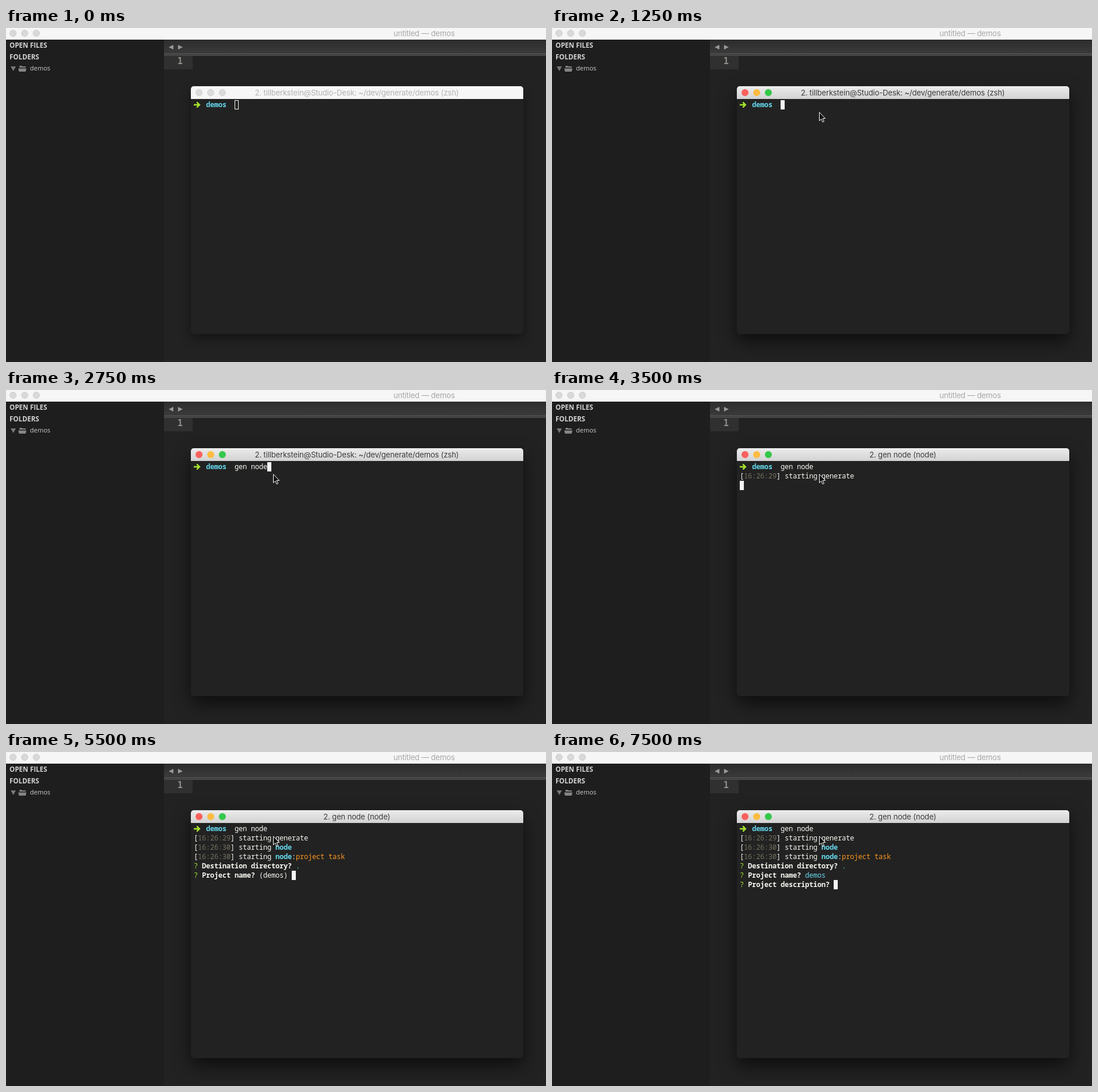
An HTML page that plays this animation: 926 by 574 pixels, repeating every 8 s.

```html
<!DOCTYPE html>
<html lang="en">
<head>
<meta charset="utf-8">
<title>Terminal session</title>
<style>
  html, body { margin: 0; width: 100%; height: 100%; overflow: hidden; background: #222; }
  svg { display: block; width: 926px; height: 574px; }
  text { white-space: pre; }

  .title { font: 13px Inter, sans-serif; letter-spacing: -.15px; text-anchor: middle; fill: #3c3c3c; }
  .faded { fill: #b2b2b2; }
  .side { font: 11px "Open Sans", sans-serif; fill: #ccc; }
  .head { font: bold 11.5px "Open Sans", sans-serif; fill: #d2d2d2; }
  .gutter { font: bold 15px "DejaVu Sans Mono", monospace; fill: #8f908a; }
  .shell { font: 12px "Noto Sans Mono", monospace; letter-spacing: -.2px; fill: #f8f8f2; }
  .b { font-weight: bold; }
  .c { fill: #66d9ef; }
  .g { fill: #a6e22e; }
  .o { fill: #fd971f; }
  .d { fill: #75715e; }

  .rest { filter: drop-shadow(0 8px 9px rgba(0, 0, 0, .4)); }
  .lift { filter: drop-shadow(0 13px 15px rgba(0, 0, 0, .6)); }

  /* every change is a hard cut within one 8 s loop */
  .s, #block, #mouse { animation: 8s step-end infinite; }
  #block { animation-name: block; }
  #mouse { animation-name: mouse; }

  @keyframes idle    { 0% { visibility: visible } 15.625%, 100% { visibility: hidden } }
  @keyframes active  { 0% { visibility: hidden } 15.625%, 100% { visibility: visible } }
  @keyframes prompt  { 0% { visibility: hidden } 15.625% { visibility: visible } 40.625%, 100% { visibility: hidden } }
  @keyframes launch  { 0% { visibility: hidden } 40.625% { visibility: visible } 43.75%, 100% { visibility: hidden } }
  @keyframes key1    { 0% { visibility: hidden } 25%, 100% { visibility: visible } }
  @keyframes key2    { 0% { visibility: hidden } 28.125%, 100% { visibility: visible } }
  @keyframes key3    { 0% { visibility: hidden } 31.25%, 100% { visibility: visible } }
  @keyframes key4    { 0% { visibility: hidden } 34.375%, 100% { visibility: visible } }
  @keyframes start   { 0% { visibility: hidden } 43.75%, 100% { visibility: visible } }
  @keyframes ask1    { 0% { visibility: hidden } 53.125%, 100% { visibility: visible } }
  @keyframes hint1   { 0% { visibility: hidden } 53.125% { visibility: visible } 65.625%, 100% { visibility: hidden } }
  @keyframes answer1 { 0% { visibility: hidden } 65.625%, 100% { visibility: visible } }
  @keyframes ask2    { 0% { visibility: hidden } 68.75%, 100% { visibility: visible } }
  @keyframes hint2   { 0% { visibility: hidden } 68.75% { visibility: visible } 84.375%, 100% { visibility: hidden } }
  @keyframes ask3    { 0% { visibility: hidden } 84.375%, 100% { visibility: visible } }

  @keyframes block {
    0%      { visibility: hidden;  transform: translate(392px, 124px) }
    15.625% { visibility: visible; transform: translate(392px, 124px) }
    25%     { visibility: visible; transform: translate(406px, 124px) }
    28.125% { visibility: visible; transform: translate(420px, 124px) }
    31.25%  { visibility: visible; transform: translate(434px, 124px) }
    34.375% { visibility: visible; transform: translate(448px, 124px) }
    40.625% { visibility: visible; transform: translate(322px, 140px) }
    43.75%  { visibility: visible; transform: translate(322px, 156px) }
    53.125% { visibility: visible; transform: translate(525px, 188px) }
    65.625% { visibility: visible; transform: translate(322px, 204px) }
    68.75%  { visibility: visible; transform: translate(490px, 204px) }
    84.375%, 100% { visibility: visible; transform: translate(483px, 220px) }
  }
  @keyframes mouse {
    0%      { visibility: hidden;  transform: translate(908px, 26px) }
    3.125%  { visibility: visible; transform: translate(908px, 26px) }
    6.25%   { visibility: visible; transform: translate(629px, 187px) }
    9.375%  { visibility: visible; transform: translate(493px, 154px) }
    12.5%   { visibility: visible; transform: translate(462px, 143px) }
    15.625%, 100% { visibility: visible; transform: translate(458px, 144px) }
  }
</style>
</head>
<body>
<svg viewBox="0 0 926 574">
  <defs>
    <linearGradient id="tabs" x2="0" y2="1">
      <stop stop-color="#2c2c2c"/><stop offset="1" stop-color="#3b3b3b"/>
    </linearGradient>
    <linearGradient id="bar" x2="0" y2="1">
      <stop stop-color="#ececec"/><stop offset="1" stop-color="#d2d2d2"/>
    </linearGradient>
    <path id="top" d="M317 122V105a5 5 0 0 1 5-5H882a5 5 0 0 1 5 5V122Z"/>
    <rect id="win" x="317" y="100" width="570" height="426" rx="5" fill="#222"/>
  </defs>

  <!-- editor -->
  <rect width="926" height="574" fill="#222"/>
  <rect y="20" width="271" height="554" fill="#1e1e1e"/>
  <rect x="271" y="20" width="655" height="24" fill="url(#tabs)"/>
  <rect x="271" y="44" width="655" height="1" fill="#606060"/>
  <rect x="271" y="45" width="655" height="1" fill="#333"/>
  <rect x="271" y="46" width="655" height="2" fill="#484848"/>
  <rect x="271" y="48" width="49" height="23" fill="#303030"/>
  <rect width="926" height="20" fill="#f6f6f6"/>
  <g fill="#d9d9d9" stroke="#cdcdcd">
    <circle cx="12" cy="9" r="5.5"/><circle cx="32" cy="9" r="5.5"/><circle cx="52" cy="9" r="5.5"/>
  </g>
  <text class="title" x="717" y="14" style="fill:#a6a6a6">untitled — demos</text>
  <path d="M279 33l8-4v8ZM303 33l-8-4v8Z" fill="#999"/>
  <text class="gutter" x="294" y="62">1</text>
  <text class="head" x="6" y="34">OPEN FILES</text>
  <text class="head" x="6" y="54">FOLDERS</text>
  <path d="M8 66h9l-4.500 8Z" fill="#777"/>
  <path d="M23 68v-2q0-1 1-1h3l1 1h5q1 0 1 1v1ZM21 69.500h14l-1 4.500q0 1-1 1H23q-1 0-1-1Z" fill="#858585"/>
  <text class="side" x="41" y="73">demos</text>

  <!-- terminal window, resting then focused -->
  <g class="s" style="animation-name:idle">
    <use href="#win" class="rest"/>
    <use href="#top" fill="#f6f6f6"/>
    <g fill="#dcdcdc" stroke="#d0d0d0">
      <circle cx="331" cy="111" r="5.500"/><circle cx="351" cy="111" r="5.500"/><circle cx="371" cy="111" r="5.500"/>
    </g>
    <text class="title faded" x="601.500" y="116">2. tillberkstein@Studio-Desk: ~/dev/generate/demos (zsh)</text>
    <rect x="392.500" y="124.500" width="6" height="15" fill="none" stroke="#f8f8f2"/>
  </g>
  <g class="s" style="animation-name:active">
    <use href="#win" class="lift"/>
    <use href="#top" fill="url(#bar)"/>
    <circle cx="331" cy="111" r="6" fill="#fc605c"/>
    <circle cx="351" cy="111" r="6" fill="#fdbc40"/>
    <circle cx="371" cy="111" r="6" fill="#34c84a"/>
  </g>
  <text class="title s" x="601.500" y="116" style="animation-name:prompt">2. tillberkstein@Studio-Desk: ~/dev/generate/demos (zsh)</text>
  <text class="title s" x="601.500" y="116" style="animation-name:launch">2. gen node (zsh)</text>
  <text class="title s" x="601.500" y="116" style="animation-name:start">2. gen node (node)</text>

  <!-- shell output -->
  <path class="g" d="M322 130.700h6l-1.500-3.700h2l5 5-5 5h-2l1.500-3.700h-6Z"/>
  <g class="shell">
    <text class="b c" x="343" y="136">demos</text>
    <text class="s" x="392" y="136" style="animation-name:key1">ge</text>
    <text class="s" x="406" y="136" style="animation-name:key2">n</text>
    <text class="s" x="420" y="136" style="animation-name:key3">no</text>
    <text class="s" x="434" y="136" style="animation-name:key4">de</text>

    <text class="s" x="322" y="152" style="animation-name:start">[<tspan class="d">16:26:29</tspan>] starting generate</text>

    <g class="s" style="animation-name:ask1">
      <text x="322" y="168">[<tspan class="d">16:26:30</tspan>] starting <tspan class="b c">node</tspan></text>
      <text x="322" y="184">[<tspan class="d">16:26:30</tspan>] starting <tspan class="b c">node</tspan>:<tspan class="o">project task</tspan></text>
      <text x="322" y="200"><tspan class="g">?</tspan> <tspan class="b">Destination directory?</tspan></text>
    </g>
    <text class="s" x="497" y="200" style="animation-name:hint1">(.)</text>
    <text class="s c" x="497" y="200" style="animation-name:answer1">.</text>

    <text class="s" x="322" y="216" style="animation-name:ask2"><tspan class="g">?</tspan> <tspan class="b">Project name?</tspan></text>
    <text class="s" x="434" y="216" style="animation-name:hint2">(demos)</text>
    <text class="s c" x="434" y="216" style="animation-name:ask3">demos</text>

    <text class="s" x="322" y="232" style="animation-name:ask3"><tspan class="g">?</tspan> <tspan class="b">Project description?</tspan></text>
  </g>
  <rect id="block" width="7" height="16" fill="#f4f4f4"/>

  <path id="mouse" d="M.5 .8V15.500l3.300-3.200 2.300 5.400 2.400-1-2.300-5.200h4.500Z" fill="#111" stroke="#fff"/>
</svg>
</body>
</html>
```
